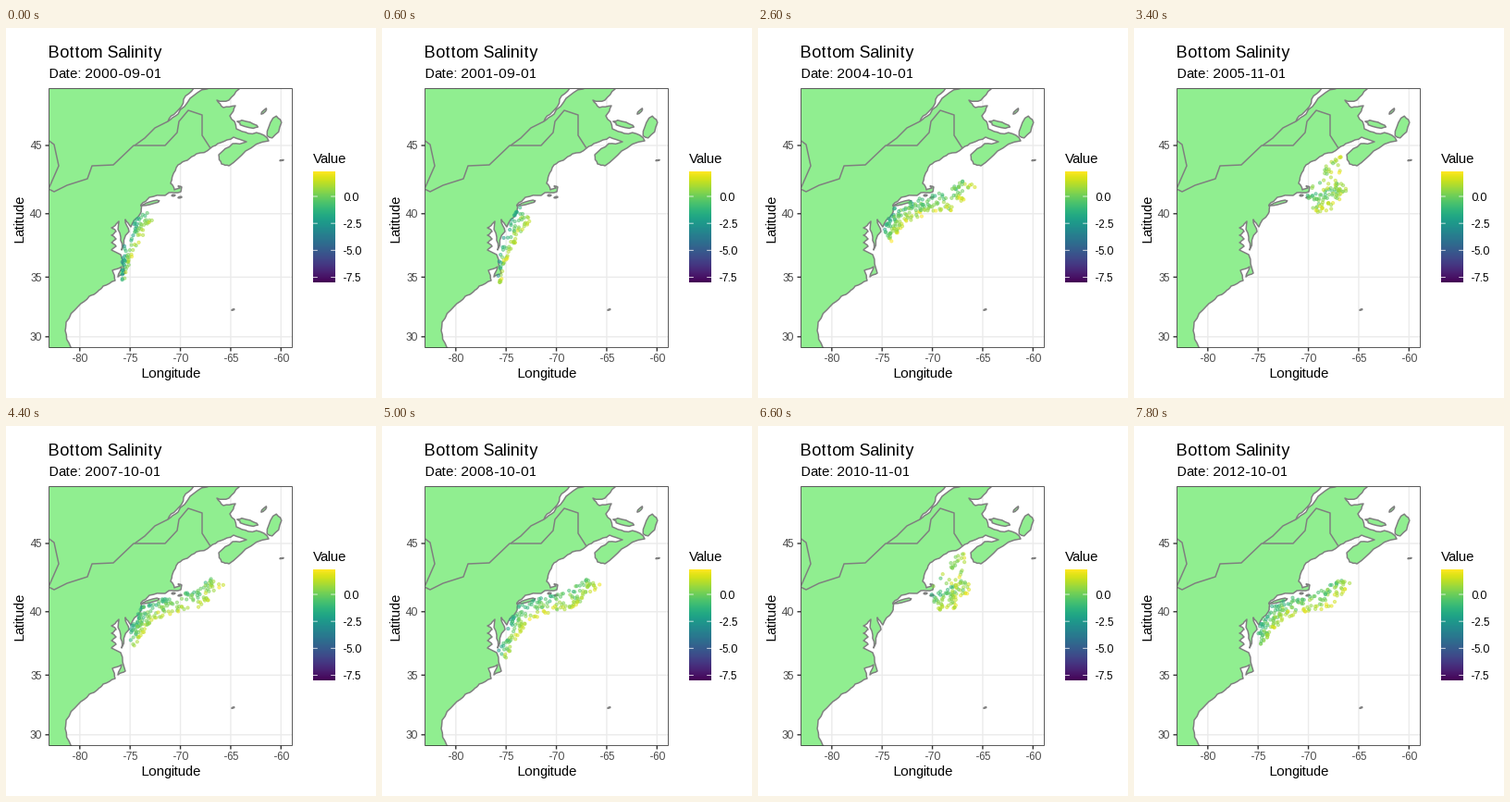
These frames come from a looping animation (400 by 400 pixels, 8000 ms). A matplotlib script:

```python
import numpy as np
import matplotlib.pyplot as plt
from matplotlib.animation import FuncAnimation
from matplotlib.patches import Polygon, Rectangle

# Whole-pixel glyph advances
plt.rcParams.update({
    "font.family": "Liberation Sans",
    "text.hinting": "force_autohint",
    "text.hinting_factor": 1,
})

SIZE, DPI = 400, 100
PX = 72 / DPI                       # points per pixel
LEFT, RIGHT, TOP, BOTTOM = 46.5, 309.5, 65.5, 345.5
LAND, COAST = "#90ee90", "#7f7f7f"
GRID, TICK, TICK_TEXT = "#ebebeb", "#333333", "#4d4d4d"
V_MIN, V_MAX = -7.98, 2.32

# Capes and bay heads in stage pixels; rough() fills in the shore between them
GULF_COAST = [
    (206, 60), (203, 65), (192, 77), (184, 91), (175, 101), (186, 93),
    (199, 76), (217, 66), (240, 58), (252, 66), (241, 78), (228, 78),
    (235, 86), (248, 84), (242, 95), (249, 109), (262, 114), (279, 116),
    (284, 122), (259, 133), (241, 149), (233, 147), (230, 137), (245, 125),
    (260, 123), (246, 118), (232, 124), (221, 130),
]
EAST_COAST = [
    (206, 136), (196, 143), (186, 148), (180, 160), (178, 168), (182, 175),
    (188, 173), (186, 171), (190, 172), (189, 177), (176, 178), (172, 181),
    (155, 183), (146, 191), (145, 201), (135, 215), (129, 207), (133, 220),
    (125, 240), (124, 226), (122, 209),
]
CHESAPEAKE = [(119 - 5 * (k % 2), 212 + 4 * k) for k in range(8)]
SOUTH_COAST = [
    (124, 245), (129, 265), (121, 269), (125, 258), (115, 262), (118, 273),
    (105, 279), (99, 285), (90, 290), (78, 301), (65, 318), (64, 327),
    (70, 345), (73, 352),
]
RIVER = [(139, 127), (150, 119), (161, 108), (175, 101)]
BORDER = [
    (40, 117), (52, 126), (57, 149), (46, 174), (52, 177), (66, 170),
    (88, 163), (93, 149), (116, 148), (138, 127), (172, 127), (185, 113),
    (187, 101), (197, 89), (212, 94), (212, 116), (221, 130),
]
# centre x, centre y, length, width, tilt in degrees
ISLANDS = [
    (261, 104, 21, 6, 15), (290, 107, 23, 12, -65), (279, 90, 8, 2.5, -45),
    (157, 189, 21, 3, -15), (181, 181, 4, 1.5, 0), (188, 183, 4, 1.5, -10),
    (298, 143, 4, 0.8, -10), (245.5, 304.5, 3, 1, -20),
]

# Matching points on the shore side and the deep side of the survey areas
SHELF = (np.array([(125, 272), (126, 240), (138, 211), (147, 195),
                   (172, 185), (205, 176), (222, 165)]),
         np.array([(128, 276), (135, 250), (147, 226), (160, 210),
                   (185, 201), (212, 197), (236, 171)]))
GULF = (np.array([(186, 176), (204, 155), (213, 140)]),
        np.array([(217, 178), (223, 158), (225, 137)]))

DATES = [(y, m) for y in range(2000, 2013) for m in (9, 10, 11, 12)
         if (m < 12 or y in (2009, 2010)) and (y, m) <= (2012, 10)]


def rough(points, rng, amount=0.12, depth=2):
    """Split each stretch in half repeatedly, nudging midpoints sideways."""
    p = np.array(points, float)
    for _ in range(depth):
        step = np.diff(p, axis=0)
        side = step[:, ::-1] * (1, -1)
        mid = p[:-1] + step / 2 + side * rng.uniform(-amount, amount, (len(step), 1))
        p = np.vstack([np.stack([p[:-1], mid], 1).reshape(-1, 2), p[-1:]])
    return p


def island(x, y, length, width, tilt, rng):
    a = np.linspace(0, 2 * np.pi, 14, endpoint=False)
    r = rng.uniform(0.8, 1.15, a.size) / 2
    u, v = length * r * np.cos(a), width * r * np.sin(a)
    c, s = np.cos(np.radians(tilt)), np.sin(np.radians(tilt))
    return np.column_stack([x + u * c - v * s, y + u * s + v * c])


def band(rng, sides, start, end, count):
    """Random stations between the two sides of an area."""
    s = rng.uniform(start, end, count)
    t = rng.random(count)
    nodes = np.arange(len(sides[0]))
    near, deep = (np.column_stack([np.interp(s, nodes, side[:, k]) for k in (0, 1)])
                  for side in sides)
    return near + (deep - near) * t[:, None], s, t


def stations(year, month):
    """The survey works its way north from September to December."""
    rng = np.random.default_rng(year * 100 + month)
    late = month >= 11
    if late:
        start, end, count = 4.4, 5.9, 75 if month == 11 else 20
    elif month == 10:
        start, end, count = rng.uniform(0.7, 1.8), 6, 175
    else:
        start, end, count = 0, 3.1, 80
    pts, s, t = band(rng, SHELF, start, end, count)
    shore = -0.3 - 0.4 * (6 - s)
    value = shore + (1.5 - shore) * t
    if late:
        more, _, t = band(rng, GULF, 0, 2, 30)
        pts = np.vstack([pts, more])
        value = np.append(value, 0.2 + 1.3 * t)
    return pts, value + rng.normal(0, 0.5, value.size)


def lat_y(lat):
    merc = np.log(np.tan(np.pi / 4 + np.radians(lat) / 2))
    return 127 - (merc - 0.88137) * 622.8


def lon_x(lon):
    return 79.8 + (lon + 80) * 10.875


fig = plt.figure(figsize=(SIZE / DPI, SIZE / DPI), dpi=DPI, facecolor="white")
ax = fig.add_axes([0, 0, 1, 1])
ax.axis("off")


def label(x, y, s, size, color="black", **kw):
    return ax.text(x, y, s, fontsize=size, color=color, va="baseline", **kw)


def line(points, color, width, z):
    return ax.plot(*zip(*points), color=color, lw=width * PX, zorder=z,
                   solid_capstyle="butt", snap=False)[0]


panel = Rectangle((LEFT, TOP), RIGHT - LEFT, BOTTOM - TOP, fc="none",
                  ec=TICK, alpha=0.8, lw=PX, zorder=8, snap=False)
ax.add_patch(panel)

for lon in range(-80, -59, 5):
    x = lon_x(lon)
    line([(x, TOP), (x, BOTTOM)], GRID, 1.4, 1)
    line([(x, BOTTOM), (x, BOTTOM + 4)], TICK, 1.4, 7)
    label(x, 361, str(lon), 8.8, TICK_TEXT, ha="center")
for lat in range(30, 46, 5):
    y = lat_y(lat)
    line([(LEFT, y), (RIGHT, y)], GRID, 1.4, 1)
    line([(LEFT - 4, y), (LEFT, y)], TICK, 1.4, 7)
    label(38.5, y + 4.5, str(lat), 8.8, TICK_TEXT, ha="right")

land_rng = np.random.default_rng(4)
shore = np.vstack([rough(GULF_COAST + EAST_COAST, land_rng),
                   rough(CHESAPEAKE, land_rng),
                   rough(SOUTH_COAST, land_rng, 0.08),
                   [(30, 352), (30, 50)]])
for shape in [shore] + [island(*i, land_rng) for i in ISLANDS]:
    land = Polygon(shape, fc=LAND, ec=COAST, lw=1.5 * PX, joinstyle="round", zorder=2)
    ax.add_patch(land)
    land.set_clip_path(panel)
for path in (BORDER, RIVER):
    line(path, COAST, 1.5, 3).set_clip_path(panel)

label(46, 32, "Bottom Salinity", 13.2)
subtitle = label(46, 54, "", 11.1)
label(178, 378, "Longitude", 11.1, ha="center")
label(18.5, 205.5, "Latitude", 11.1, ha="center", rotation=90, rotation_mode="anchor")

# Colour bar
label(332, 146, "Value", 11.1)
ax.imshow(np.linspace(1, 0, 300)[:, None], cmap="viridis", aspect="auto",
          extent=(332, 356, 275, 155), zorder=2)
for v in (0.0, -2.5, -5.0, -7.5):
    y = 155 + (V_MAX - v) / (V_MAX - V_MIN) * 120
    for x in (332, 351.2):
        line([(x, y), (x + 4.8, y)], "white", 0.75, 3)
    label(364, y + 4.5, f"{v:.1f}", 8.8)

dots = ax.scatter([], [], s=(3.3 * PX) ** 2, linewidths=0.9 * PX, zorder=5)
dots.set_clip_path(panel)
ax.set_xlim(0, SIZE)
ax.set_ylim(SIZE, 0)


def draw(i):
    year, month = DATES[i]
    pts, value = stations(year, month)
    colors = plt.cm.viridis(np.clip((value - V_MIN) / (V_MAX - V_MIN), 0, 1))
    colors[:, 3] = 0.5
    dots.set_offsets(pts)
    dots.set_facecolor(colors)
    dots.set_edgecolor(colors)
    subtitle.set_text(f"Date: {year}-{month:02d}-01")
    return dots, subtitle


anim = FuncAnimation(fig, draw, frames=len(DATES), interval=200,
                     repeat=True, repeat_delay=0)
plt.show()
```
